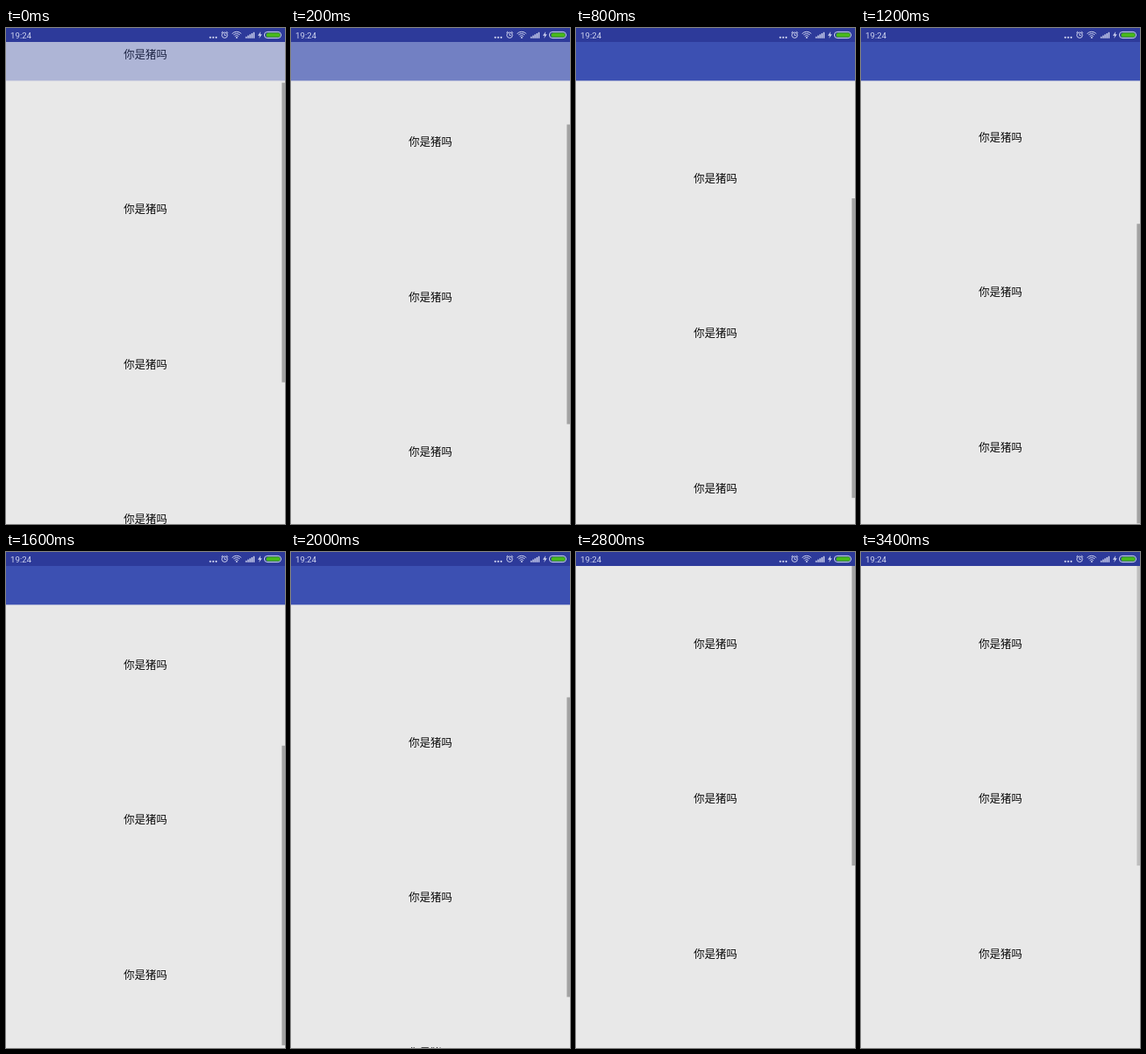
Write an HTML page with a canvas that moves like this. It is 320 px wide and 568 px high and loops after 3.6 s.

```html
<!DOCTYPE html>
<html lang="zh-CN">
<head>
<meta charset="utf-8">
<title>Fading toolbar</title>
<style>
html, body { margin: 0; width: 100%; height: 100%; overflow: hidden; background: #e8e8e8; }
canvas { display: block; width: 320px; height: 568px; }
</style>
</head>
<body>
<canvas id="stage"></canvas>
<script>
const W = 320, H = 568, TOP = 16, BAR_H = 44.4;
const ITEM_H = 177.6, ITEMS = 5, VIEW = H - TOP, CONTENT = ITEM_H * ITEMS;
const LOOP = 3600, STEP = 200;

// Scroll offset of the list, sampled every STEP ms
const SCROLL = [75, 152, 200, 248, 288, 323, 335, 335, 331, 295, 242, 152, 76, 20, 0, 0, 0, 0];
const RETURN_STEP = 11, FADE_STEP = 17;

const canvas = document.getElementById('stage');
const ratio = window.devicePixelRatio || 1;
canvas.width = W * ratio;
canvas.height = H * ratio;
const ctx = canvas.getContext('2d');
ctx.scale(ratio, ratio);

function rect(color, x, y, w, h) {
  ctx.fillStyle = color;
  ctx.fillRect(x, y, w, h);
}

function line(...points) {
  ctx.beginPath();
  for (let i = 0; i < points.length; i += 2) ctx.lineTo(points[i], points[i + 1]);
  ctx.stroke();
}

function arc(x, y, r, from = 0, to = Math.PI * 2) {
  ctx.beginPath();
  ctx.arc(x, y, r, from, to);
}

function pill(x, y, w, h) {
  ctx.beginPath();
  ctx.roundRect(x, y, w, h, h / 2);
}

function drawList(scroll) {
  ctx.fillStyle = '#080808';
  ctx.font = '12.44px "Noto Sans CJK SC", "Noto Sans CJK", sans-serif';
  ctx.textAlign = 'center';
  ctx.textBaseline = 'alphabetic';
  for (let i = 0; i < ITEMS; i++) {
    ctx.fillText('你是猪吗', W / 2, 109.6 + i * ITEM_H - scroll);
  }
}

function drawThumb(scroll, alpha) {
  const k = VIEW / CONTENT;
  rect(`rgba(0,0,0,${0.3 * alpha})`, 316.4, TOP + scroll * k, 3.6, VIEW * k);
}

function drawToolbar(alpha) {
  rect(`rgba(60,80,178,${alpha})`, 0, TOP, W, BAR_H);
}

function drawStatus() {
  const ink = '#cdd2ee';
  rect('#2d3a9a', 0, 0, W, TOP);
  ctx.fillStyle = ctx.strokeStyle = ink;
  ctx.lineWidth = 1;

  ctx.font = '9.7px Roboto, sans-serif';
  ctx.textAlign = 'left';
  ctx.fillText('19:24', 5, 11.8);

  for (let i = 0; i < 3; i++) {
    arc(234.3 + i * 3.4, 10.8, 1.15);
    ctx.fill();
  }

  // Alarm clock
  arc(250.8, 8.2, 3.2);
  ctx.stroke();
  line(250.8, 6.3, 250.8, 8.5, 252.3, 8.5);
  line(247, 5.6, 248.9, 4);
  line(254.6, 5.6, 252.7, 4);

  // Wi-Fi
  for (const r of [2.8, 5, 7.2]) {
    arc(264.6, 11.5, r, -Math.PI * 0.76, -Math.PI * 0.24);
    ctx.stroke();
  }
  arc(264.6, 10.9, 1);
  ctx.fill();

  // Signal
  for (let i = 0; i < 5; i++) {
    const h = 2 + i * 1.25;
    rect(ink, 274.8 + i * 2.2, 11.8 - h, 1.5, h);
  }

  // Charging bolt
  ctx.beginPath();
  for (const [x, y] of [[292.2, 4], [288.8, 8.7], [291, 8.7], [290.2, 12], [293.6, 7.3], [291.5, 7.3]]) ctx.lineTo(x, y);
  ctx.fill();

  // Battery
  pill(296.3, 4.4, 19.2, 7.2);
  ctx.stroke();
  ctx.fillStyle = '#48b81c';
  pill(298.4, 5.4, 16.2, 5.2);
  ctx.fill();
}

function draw(now) {
  const step = Math.floor((now % LOOP) / STEP);
  const scroll = SCROLL[step];
  const shown = Math.min(1, scroll / 222);
  rect('#e8e8e8', 0, 0, W, H);
  drawList(scroll);
  drawThumb(scroll, step >= FADE_STEP ? 0.6 : 1);
  drawToolbar(step < RETURN_STEP ? shown : shown ** 1.5);
  drawStatus();
}

let start;
function tick(now) {
  start ??= now;
  draw(now - start);
  requestAnimationFrame(tick);
}
draw(0);
requestAnimationFrame(tick);
</script>
</body>
</html>
```
